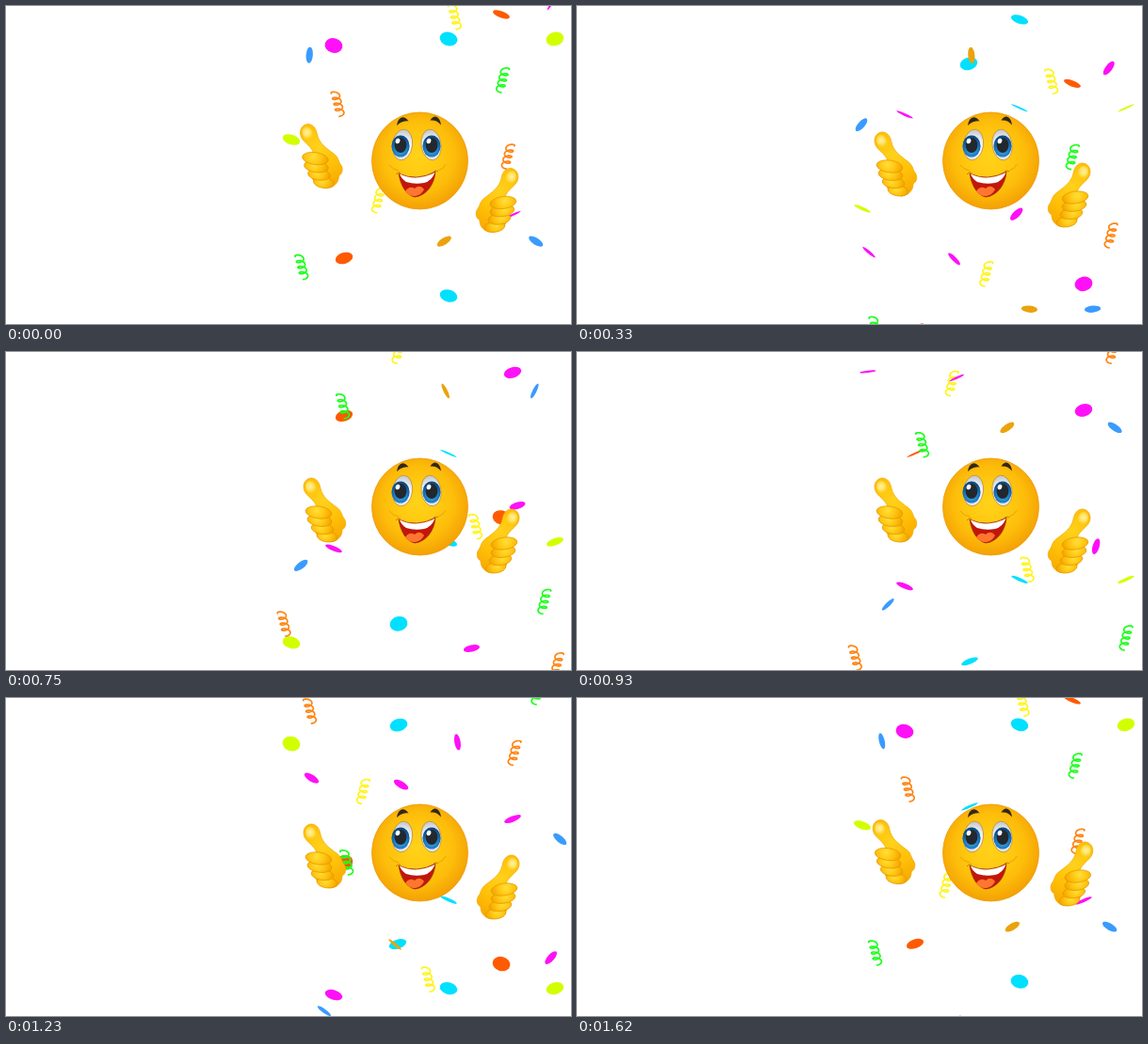
An HTML page with a canvas for the animation above (1.65 s loop, 600x338 px).

```html
<!DOCTYPE html>
<html lang="en">
<head>
<meta charset="utf-8">
<title>Thumbs up confetti</title>
<style>
  html, body { margin: 0; width: 100%; height: 100%; overflow: hidden; background: #fff; }
  canvas { display: block; }
</style>
</head>
<body>
<canvas id="stage" width="600" height="338"></canvas>
<script>
const ctx = document.getElementById('stage').getContext('2d');
const LOOP = 1650, STEP = 30, FALL = 367;
const TAU = Math.PI * 2, DEG = Math.PI / 180;
const CYAN = '#00e0ff', MAGENTA = '#ff10f8', LIME = '#d2ff00', RED = '#ff5a00',
      GOLD = '#eaa30c', BLUE = '#3a9bff', GREEN = '#1cff1c', ORANGE = '#ff8412', YELLOW = '#fff41c';

// Each piece: x, height at time zero, colour, side (mirrors tilt and sway)
const discs = [
  [470, 35, CYAN, 1], [583, 35, LIME, -1], [348, 42, MAGENTA, 1], [303, 142, LIME, 1],
  [470, 308, CYAN, 1], [526, 9, RED, 1], [538, 222, MAGENTA, -1], [359, 268, RED, -1],
  [416, 355, CYAN, -1], [417, 122, CYAN, -1]
];
const chips = [
  [319, 183, MAGENTA, 1], [412, 190, MAGENTA, 1], [567, 245, BLUE, 1], [422, 350, GOLD, 1],
  [319, 56, BLUE, -1], [475, 144, MAGENTA, -1], [565, 364, MAGENTA, -1], [461, 245, GOLD, -1]
];
const coils = [
  [553, 88, GREEN, 1], [560, 161, ORANGE, 1], [408, 201, YELLOW, 1],
  [478, 16, YELLOW, -1], [338, 267, GREEN, -1], [323, 112, ORANGE, -1]
];

const mod = (a, n) => ((a % n) + n) % n;
const clamp = v => Math.min(1, Math.max(0, v));
const angle = (y, peak) => TAU * (y - peak) / FALL;
const fallAt = (start, t) => mod(start + FALL * t / LOOP + 15, FALL) - 15;

function ellipse(x, y, rx, ry, tilt, fill, stroke, width = 1) {
  const p = new Path2D();
  p.ellipse(x, y, rx, ry, tilt * DEG, 0, TAU);
  paint(p, fill, stroke, width);
}

function shape(path, fill, stroke, width = 1) {
  paint(new Path2D(path), fill, stroke, width);
}

function paint(path, fill, stroke, width) {
  if (fill) { ctx.fillStyle = fill; ctx.fill(path); }
  if (stroke) { ctx.strokeStyle = stroke; ctx.lineWidth = width; ctx.stroke(path); }
}

function glow(x, y, r, ...colours) {
  const g = ctx.createRadialGradient(x, y, 0, x, y, r);
  colours.forEach((c, i) => g.addColorStop(i / (colours.length - 1), c));
  return g;
}

// Falls straight and flips three times per fall
function drawDisc([x, start, colour, side], t) {
  const y = fallAt(start, t);
  const ry = 1 + 6.8 * Math.cos(1.5 * angle(y, 45)) ** 2;
  ellipse(x, y, 9.5, ry, side * (26 - ry * 1.5), colour);
}

// Sways while tumbling through two slow half turns and one quick, edge-on one
function drawChip([x, start, colour, side], t) {
  const p = fallAt(start, t);
  const y = p + 0.5 - 5 * Math.cos(angle(p, 85));
  const sway = 3 * Math.cos(2 * angle(y, 0)) - 20 * Math.cos(angle(y, 335));
  const q = mod(y - 37, FALL);
  const turn = q / 150 + Math.max(0, q - 300) / 121;
  const slow = TAU * Math.min(turn, 2);
  const tilt = -50 - 180 * turn - 45 * Math.sin(slow);
  const ry = Math.min(3.6, 1.2 + 5 * Math.abs(Math.sin(slow - 0.12 * Math.sin(slow / 4) ** 2)));
  ellipse(x + side * sway, y, 8.7, ry, side * tilt, colour);
}

function drawCoil([x, start, colour, side], t) {
  const p = fallAt(start, t);
  const y = p + 10 * Math.cos(angle(p, 262));
  const a = angle(y, 306);
  ctx.save();
  ctx.translate(x + side * 30 * Math.cos(a + 0.3 * Math.sin(a)), y);
  ctx.rotate(side * 14 * DEG);
  ctx.scale(side, 1);
  const coil = new Path2D();
  for (let u = 0; u <= 1; u += 0.01) {
    const w = u * TAU * 3.9;
    coil.lineTo(4 * Math.cos(w) + 1.2 * Math.sin(w), -12 + 24 * u - 2.5 * Math.sin(w));
  }
  ctx.lineJoin = ctx.lineCap = 'round';
  paint(coil, null, colour, 1.7);
  ctx.restore();
}

function drawHand(x, y, side) {
  ctx.save();
  ctx.translate(x, y);
  ctx.scale(side, 1);
  shape('M0 9C0 3 5 0 8 0C14 0 17 5 18 11C20 20 27 25 35 31C41 35 40 39 43 43' +
        'C46 47 45 53 41 55C41 61 38 64 35 66C28 70 16 66 14 60C8 50 9 35 14 31' +
        'C13 26 8 22 4 18C1 15 0 12 0 9Z',
        glow(20, 24, 46, '#ffd21c', '#ffc008', '#f6a600'), '#f0a800', 0.7);
  ellipse(8, 10, 5.5, 8, -20, glow(7, 9, 8, '#fff0a0', '#ffe262', 'rgba(255,214,30,0)'));
  for (let i = 3; i >= 0; i--) {
    const fx = 16 + i * i, fy = 36.5 + 8.6 * i, rx = 14 - i;
    ellipse(fx, fy, rx, 6.5 - i * 0.3, 8,
      glow(fx - 2, fy - 2, rx + 1, '#ffe03a', '#ffc814', '#f6a800'), '#e39400', 0.7);
  }
  ctx.restore();
}

function drawEye(x, irisX, side) {
  ellipse(x, 147.5, 10.5, 16.5, side * 8, glow(x, 150, 17, '#fff', '#f4f6f8', '#c9cdd0'), '#c08a30', 0.8);
  ellipse(irisX, 149, 9.6, 11.5, 0, glow(irisX, 153, 13, '#4bb4ee', '#1c7fc8', '#0b4a86'));
  ellipse(irisX, 148, 6.4, 8, 0, '#22282e');
  ellipse(irisX - 3, 143.5, 2.3, 2.8, 20, '#fff');
}

function drawFace() {
  ellipse(439.5, 164.5, 51, 51.5, 0,
    glow(438, 160, 57, '#ffd21a', '#ffcb12', '#fdbd0a', '#f39f04'), '#ee9a08', 0.8);
  drawEye(421, 419, 1);
  drawEye(451.5, 452, -1);
  shape('M415 127C416 119 422 114.5 427.5 122.5C422 121.5 418 124 415 127Z', '#33281a');
  shape('M462 126.5C461 118 455 114 450.5 121.5C456 121 459 123 462 126.5Z', '#33281a');
  shape('M407 169Q411 174 417 175M459 175Q465 173 467 168', null, '#eda300', 1);
  shape('M417 178Q436 187 456 176C455 190 446 202 434 203C425 201 419 191 417 178Z',
        '#c3160b', '#9a3000', 0.7);
  shape('M418 178.5Q436 187 455.5 177Q452 186 444 188Q434 190 425 187Q420 184 418 178.5Z', '#fff');
  shape('M424 197C427 192 431 192 434 194C438 190 442 192 444 195C440 203 430 205 424 197Z', '#ff7630');
  shape('M414 179Q416 176 419 177M454 176Q457 174 459 176', null, '#c97a00', 1);
}

// Both hands rest most of the loop and shake around its seam
function drawHands(t) {
  const shake = clamp(mod(t - 1260, LOOP) / 660);
  const left = 15.6 * Math.sin(TAU * shake);
  const right = t > 1230
    ? -14 * Math.sin(clamp((t - 1230) / 360) * Math.PI / 2)
    : 5.5 * (1 - clamp(t / 270));
  drawHand(316 + left * 0.42, 134 + left, 1);
  drawHand(545 - right * 0.2, 167 + right, -1);
}

function render(now) {
  const t = Math.floor(mod(now, LOOP) / STEP) * STEP;
  ctx.fillStyle = '#fff';
  ctx.fillRect(0, 0, 600, 338);
  discs.forEach(d => drawDisc(d, t));
  coils.forEach(c => drawCoil(c, t));
  chips.forEach(c => drawChip(c, t));
  drawFace();
  drawHands(t);
}

function tick() {
  render(performance.now());
  requestAnimationFrame(tick);
}
tick();
</script>
</body>
</html>
```
